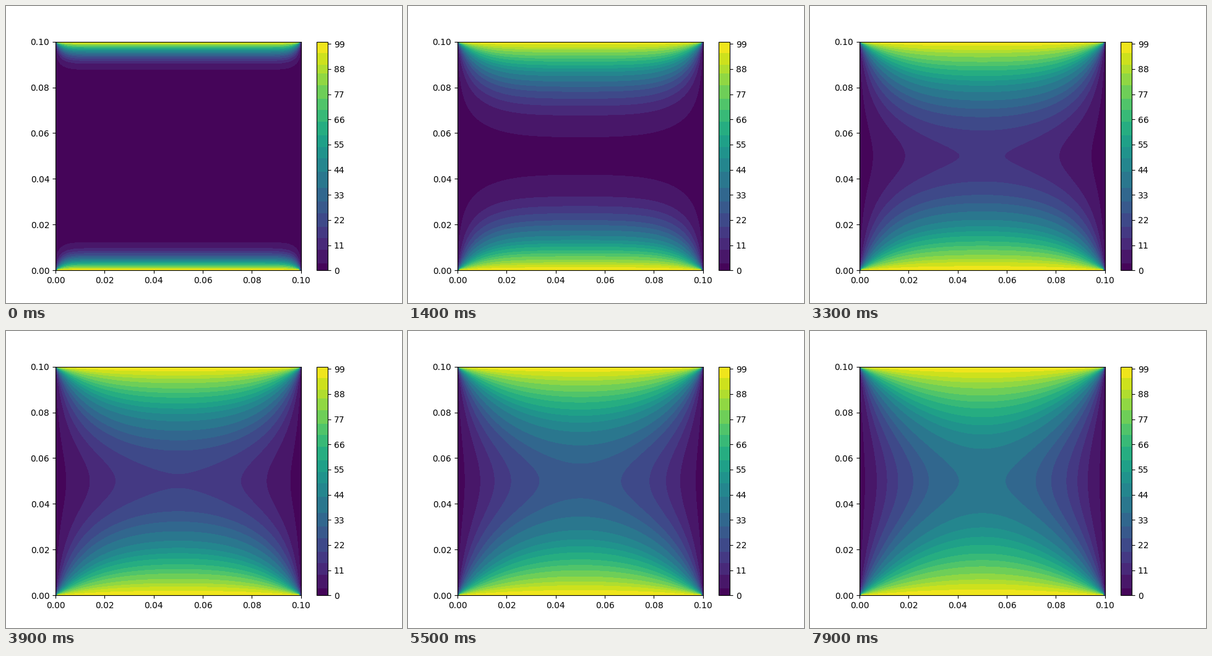
Recreate the animation shown at these times as a matplotlib script. Size 640 px wide and 480 px high, loop 8000 ms.

```python
import numpy as np
import matplotlib.pyplot as plt
from matplotlib.animation import FuncAnimation

# Heat conduction in a square plate: hot top and bottom, cold sides.
SIDE = 0.1
N = 101
ALPHA = 1.172e-5
DT = 0.02
STEPS = 50          # solver steps per frame
LEAD = 67           # solver steps before the first frame
FRAMES = 80
BANDS = [0, 3, 9, 14, 19, 25, 30, 36, 43, 49, 54, 59,
         65, 70, 75, 81, 86, 90, 95, 100]


def advance(T, steps):
    k = ALPHA * DT / (SIDE / (N - 1)) ** 2
    for _ in range(steps):
        core = T[1:-1, 1:-1]
        flow = T[2:, 1:-1] + T[:-2, 1:-1] + T[1:-1, 2:] + T[1:-1, :-2]
        T[1:-1, 1:-1] = core + k * (flow - 4 * core)
    return T


def solve():
    T = np.zeros((N, N))
    T[[0, -1], 1:-1] = 100
    advance(T, LEAD)
    history = [T.copy()]
    for _ in range(FRAMES - 1):
        history.append(advance(T, STEPS).copy())
    return history


history = solve()
axis = np.linspace(0, SIDE, N)

fig, ax = plt.subplots(figsize=(6.4, 4.8), dpi=100)


def plot(i):
    return ax.contourf(axis, axis, history[i], levels=BANDS, cmap="viridis")


field = plot(0)
fig.colorbar(field, ax=ax, spacing="proportional", ticks=range(0, 100, 11))


def update(i):
    global field
    field.remove()
    field = plot(i)
    return [field]


anim = FuncAnimation(fig, update, frames=FRAMES, interval=100,
                     repeat=True, repeat_delay=0, blit=False)
plt.show()
```
